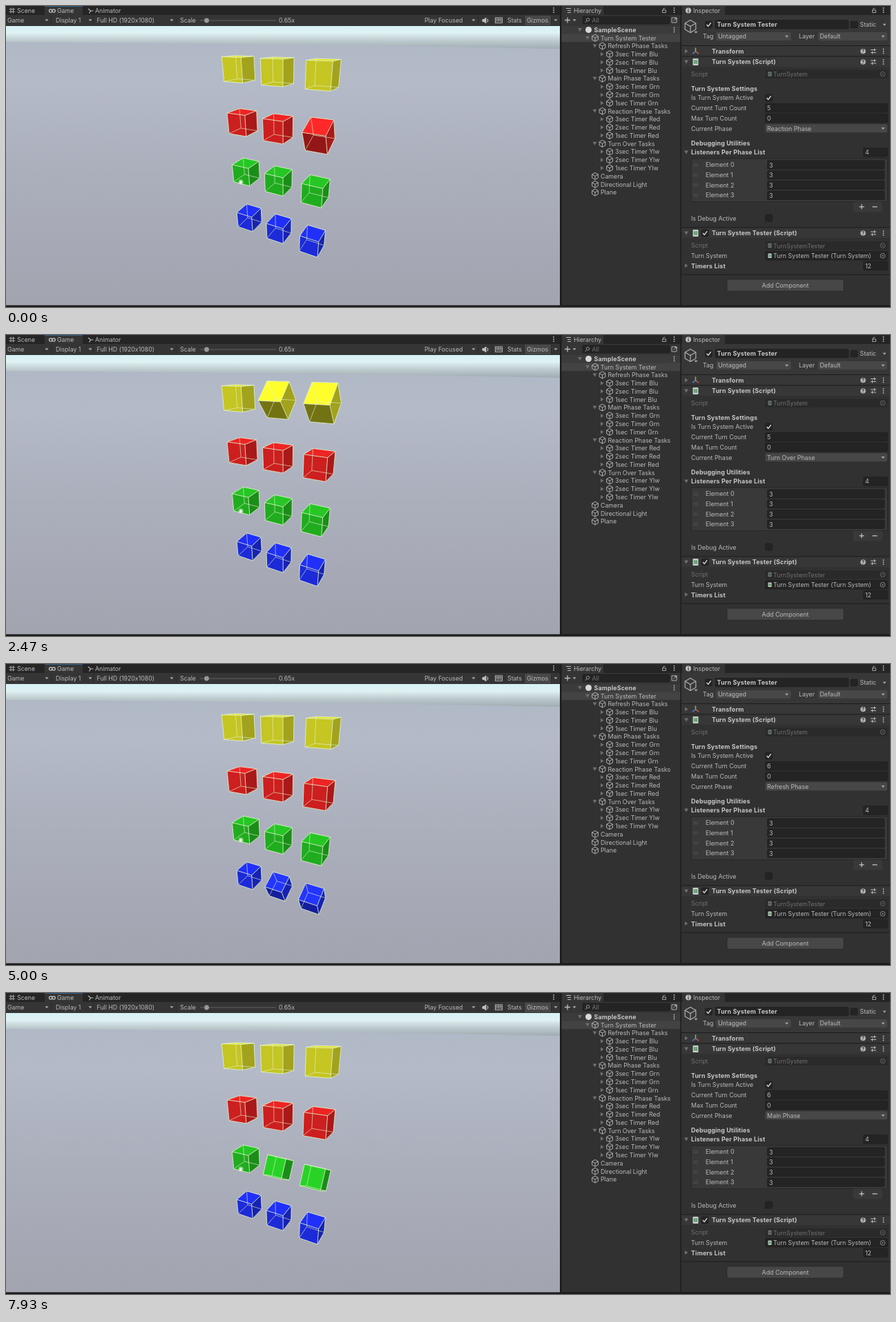
Recreate the animation shown at these times as an HTML page with a canvas. Size 1280 by 436 pixels, loop 8 s.

```html
<!DOCTYPE html>
<html lang="en">
<head>
<meta charset="utf-8">
<title>Turn System Tester</title>
<style>
  html, body { margin: 0; width: 100%; height: 100%; overflow: hidden; background: #191919; }
  canvas, svg { position: absolute; left: 0; top: 0; }
  text { font: 8.8px Inter, Roboto, sans-serif; fill: #bababa; white-space: pre; }
  .bold { font-weight: 700; fill: #c8c8c8; letter-spacing: .2px; }
  .dim { fill: #707070; }
</style>
</head>
<body>
<canvas id="game" width="802" height="436"></canvas>
<svg id="ui" width="1280" height="436" viewBox="0 0 1280 436"></svg>
<script>
const LOOP = 8000, FRAME = 1000 / 15;
const PHASE_START = 545, PHASE_LENGTH = 3000, SPIN = 540;
const PHASES = ['Reaction Phase', 'Turn Over Phase', 'Refresh Phase', 'Main Phase'];
const PHASE_ROWS = [1, 0, 3, 2];

// ---------- Editor panels ----------
const ui = document.getElementById('ui');
const BG = '#313131', HEADER = '#373737', FIELD = '#242424', BUTTON = '#474747', LINE = '#1d1d1d', INK = '#bababa';

const put = markup => ui.insertAdjacentHTML('beforeend', markup);
const rect = (x, y, w, h, fill, r = 0, extra = '') =>
  put(`<rect x="${x}" y="${y}" width="${w}" height="${h}" rx="${r}" fill="${fill}" ${extra}/>`);
const text = (x, y, s, cls = '', id = '') => put(`<text x="${x}" y="${y}" class="${cls}" id="${id}">${s}</text>`);
const path = (d, color = INK, width = 1, fill = 'none') =>
  put(`<path d="${d}" stroke="${color}" stroke-width="${width}" fill="${fill}"/>`);
const circle = (x, y, r, fill, stroke = 'none') =>
  put(`<circle cx="${x}" cy="${y}" r="${r}" fill="${fill}" stroke="${stroke}"/>`);

const caret = (x, y) => path(`M${x - 2.5} ${y - 1.2}h5l-2.5 3z`, 'none', 0, '#a8a8a8');
const foldout = (x, y, open) =>
  path(open ? `M${x - 3} ${y - 2.5}h6l-3 5z` : `M${x - 2} ${y - 3}v6l4.5 -3z`, 'none', 0, '#6f6f6f');
const kebab = (x, y) => [-3, 0, 3].forEach(d => circle(x, y + d, .9, INK));
const lock = (x, y) => path(`M${x - 2.5} ${y}h5v3.500h-5zM${x - 1.5} ${y}v-2q1.500 -2 3 0`, '#b0b0b0', .9);
const cubeIcon = (x, y, r = 5, width = 1) => {
  const w = r * .87, h = r / 2;
  path(`M${x} ${y - r}l${w} ${h}v${r}l${-w} ${h}l${-w} ${-h}v${-r}zM${x - w} ${y - h}l${w} ${h}l${w} ${-h}M${x} ${y}v${r}`, '#b0b0b0', width);
};
const field = (x, y, w, h = 12.5) => rect(x, y, w, h, FIELD, 1.5, 'stroke="#1b1b1b" stroke-width=".6"');
const dropdown = (x, y, w, label, id) => {
  rect(x, y, w, 12, BUTTON, 2);
  text(x + 2.5, y + 9.2, label, '', id);
  caret(x + w - 6, y + 6);
};
const checkbox = (x, y, on) => {
  field(x, y, 10, 10);
  if (on) path(`M${x + 2} ${y + 5}l2.2 2.5l4 -5.2`, '#d5d5d5', 1.4);
};
const scriptIcon = (x, y, k = 1, page = '#c4cdc6', mark = '#3c8a50') => {
  rect(x - 4 * k, y - 5 * k, 8 * k, 10 * k, page, 1);
  path(`M${x - 1.2 * k} ${y - 3 * k}v${6 * k}m${2.4 * k} ${-6 * k}v${6 * k}M${x - 3 * k} ${y - 1.2 * k}h${6 * k}m${-6 * k} ${2.4 * k}h${6 * k}`, mark, .9 * k);
};
const targetRing = (y, color = '#888') => { circle(1269.5, y, 3.4, 'none', color); circle(1269.5, y, 1.1, color); };
const componentHeader = (y, title, open) => {
  rect(978, y - 8, 302, 15, HEADER);
  rect(978, y - 8.5, 302, 1, LINE);
  foldout(985, y, open);
  text(1022, y + 3.2, title, 'bold');
  circle(1241, y, 3.8, '#b4b4b4');
  put(`<text x="1239" y="${y + 2.6}" style="font-size:7px;font-weight:700;fill:#333">?</text>`);
  path(`M1252 ${y - 2}h8M1252 ${y + 2}h8M1257.5 ${y - 4}v4M1254.5 ${y}v4`);
  kebab(1270.5, y);
};

function gameToolbar() {
  rect(0, 0, 803, 13, '#252525');
  rect(0, 13, 803, 16, '#353535');
  rect(56, 0, 55, 13, '#353535');
  rect(56, 0, 55, 1, '#315f8c');
  path('M7 2.5v8M10.5 2.5v8M4.5 4.8h8.5M4.5 8.3h8.5', '#aaa', 1);
  text(16, 9.7, 'Scene');
  path('M62.5 7a2.2 2.2 0 1 0 4.4 0a2.2 2.2 0 1 0 4.4 0a2.2 2.2 0 1 0 -4.4 0a2.2 2.2 0 1 0 -4.4 0', '#c8c8c8', 1.2);
  text(74, 9.7, 'Game');
  path('M119 4l3.5 3h4M122.500 7l-2 3.500', '#bababa', 1.2);
  text(129, 9.7, 'Animator');
  kebab(793, 6);
  rect(751, 14, 38, 14, '#484848');
  [[2, 'Game'], [72, 'Display 1'], [131.5, 'Full HD (1920x1080)'], [252, 'Scale'], [395, '0.65x'],
   [606, 'Play Focused'], [726, 'Stats'], [754, 'Gizmos']].forEach(([x, s]) => text(x, 23.8, s));
  [59, 122, 240, 677, 796].forEach(x => caret(x, 20.5));
  [65, 126, 246, 683, 703, 722, 750, 789].forEach(x => rect(x, 14, .7, 14, '#272727'));
  rect(281, 20.5, 110, 1, '#626262');
  circle(290.5, 21, 3.4, '#999');
  path('M690 19.500h2l3 -2.500v8l-3 -2.500h-2zM697 18.500q2 2.300 0 5', '#c0c0c0', 1, '#c0c0c0');
  rect(708.5, 17, 10, 7.5, 'none', 0, 'stroke="#bababa" stroke-width=".9"');
  path('M708.500 19.500h10M708.500 22h10M711 17v5M713.500 17v5M716 17v5', INK, .7);
  rect(0, 433.5, 1280, 2.5, '#191919');
}

function hierarchy() {
  rect(803, 0, 174, 433.5, BG);
  rect(802, 0, 2.5, 436, LINE);
  rect(804.5, 0, 172, 13, '#252525');
  rect(805, 0, 60, 13, '#353535');
  rect(804.5, 13, 172, 15, '#353535');
  path('M811 3.500h7M813 6.500h5M813 9.500h5', INK, 1.1);
  text(822, 9.7, 'Hierarchy');
  lock(953, 6); kebab(967.5, 6);
  path('M809 20.500h8M813 16.500v8', INK, 1.3);
  caret(823, 20.5);
  field(835, 15, 126, 11);
  circle(842.5, 19.8, 2.2, 'none', '#999');
  path('M841 21.500l-2.500 2.500', '#999');
  text(848.5, 23.6, 'All', 'dim');
  path('M964 17h7v7h-7zM966.500 21.500l4 -4M968 17.500h3v3', INK, .9);

  rect(804.5, 28.5, 172, 11.8, '#3b3b3b');
  rect(804.5, 40.3, 172, 11.8, '#434343');
  foldout(831, 34.5, true);
  circle(843.5, 34.5, 4.5, '#d8d8d8');
  text(851.5, 37.6, 'SampleScene', 'bold');
  kebab(967.5, 34.5);

  const rows = [[0, 'Turn System Tester', true]];
  [['Refresh Phase', 'Blu'], ['Main Phase', 'Grn'], ['Reaction Phase', 'Red'], ['Turn Over', 'Ylw']].forEach(([name, color]) => {
    rows.push([1, name + ' Tasks', true]);
    [3, 2, 1].forEach(n => rows.push([2, `${n}sec Timer ${color}`, false]));
  });
  ['Camera', 'Directional Light', 'Plane'].forEach(s => rows.push([0, s]));
  rows.forEach(([level, label, open], i) => {
    const x = level * 10.5, y = 46.2 + i * 11.78;
    if (open !== undefined) foldout(842 + x, y, open);
    cubeIcon(853 + x, y);
    text(861 + x, y + 3.3, label);
  });
}

function inspector() {
  rect(977, 0, 303, 433.5, BG);
  rect(976.5, 0, 1.5, 436, LINE);
  rect(978, 0, 302, 13, '#252525');
  rect(979, 0, 62, 13, '#353535');
  rect(978, 13, 302, 44, HEADER);
  circle(988, 6.5, 4, '#c0c0c0');
  path('M988 5.700v3.500M988 3.500v1.200', '#333', 1.2);
  text(995, 9.7, 'Inspector');
  lock(1257, 6); kebab(1270.5, 6);

  cubeIcon(991, 29.5, 9, 1.2);
  caret(999, 38);
  checkbox(1012.5, 22, true);
  field(1027, 20.5, 193);
  text(1029.5, 30.4, 'Turn System Tester', 'bold');
  checkbox(1223, 22, false);
  text(1236.5, 30.2, 'Static');
  caret(1272, 27);
  text(1009, 47.2, 'Tag');
  dropdown(1028.5, 38, 108, 'Untagged');
  text(1148, 47.2, 'Layer');
  dropdown(1176, 38, 100, 'Default');

  componentHeader(65.5, 'Transform', false);
  path('M998.500 66v-5.500', '#8bc34a', 1.5);
  path('M998.500 66l-4.500 3', '#4a8fe0', 1.5);
  path('M998.500 66l4.500 3', '#e05a48', 1.5);
  componentHeader(81, 'Turn System (Script)', true);
  scriptIcon(998.5, 81);

  const scriptRow = (y, name) => {
    text(992, y + 3, 'Script', 'dim');
    rect(1099.5, y - 6, 177, 12.5, '#2a2a2a', 1.5);
    scriptIcon(1106, y, .65, '#727673', '#35553e');
    text(1111, y + 3.5, name, 'dim');
    targetRing(y, '#666');
  };
  scriptRow(98.5, 'TurnSystem');
  text(992, 122.6, 'Turn System Settings', 'bold');
  text(992, 136, 'Is Turn System Active');
  checkbox(1099.5, 128, true);
  text(992, 150.8, 'Current Turn Count');
  field(1099.5, 141.5, 177);
  text(1102, 151.2, '5', '', 'turn');
  text(992, 165.5, 'Max Turn Count');
  field(1099.5, 156.2, 177);
  text(1102, 165.9, '0');
  text(992, 180.5, 'Current Phase');
  dropdown(1099.5, 171.3, 176.5, PHASES[0], 'phase');

  text(992, 202.2, 'Debugging Utilities', 'bold');
  foldout(985, 212, true);
  text(992, 215.4, 'Listeners Per Phase List', 'bold');
  field(1241.5, 205.7, 35);
  text(1244, 215.4, '4');
  rect(992, 221, 284.5, 62.5, '#393939', 2, 'stroke="#222" stroke-width=".7"');
  rect(1227, 283.5, 42, 15, '#393939', 2);
  for (let i = 0; i < 4; i++) {
    const y = 230 + i * 14.7;
    path(`M995 ${y - 1}h7M995 ${y + 1.5}h7`, '#555', .8);
    text(1013, y + 3.3, 'Element ' + i);
    field(1102.5, y - 6.2, 169.5);
    text(1105, y + 3.5, '3');
  }
  path('M1235.500 290.800h7M1239 287.300v7M1254.500 290.800h7', '#c8c8c8', 1.2);
  text(992, 310.8, 'Is Debug Active');
  checkbox(1099.5, 302, false);

  componentHeader(329, 'Turn System Tester (Script)', true);
  scriptIcon(998.5, 329);
  checkbox(1007, 324, true);
  scriptRow(347, 'TurnSystemTester');
  text(992, 365, 'Turn System');
  field(1099.5, 355.5, 177);
  scriptIcon(1106, 361.8, .65);
  text(1111, 365.2, 'Turn System Tester (Turn System)');
  targetRing(361.8);
  foldout(985, 376, false);
  text(992, 379.5, 'Timers List', 'bold');
  field(1241.5, 370, 35);
  text(1244, 379.7, '12');
  rect(978, 388.5, 302, 1, LINE);
  rect(1044, 396, 169, 17, BUTTON, 2, 'stroke="#272727" stroke-width=".7"');
  put('<text x="1128.5" y="407.600" text-anchor="middle">Add Component</text>');
}

gameToolbar();
hierarchy();
inspector();

// ---------- Game view ----------
const g = document.getElementById('game').getContext('2d');
const radians = d => d * Math.PI / 180;
const FOCAL = 391, CENTER = [401.5, 255], SIZE = .078;
const [PS, PC] = [Math.sin(radians(28)), Math.cos(radians(28))];
const [YS, YC] = [Math.sin(radians(27)), Math.cos(radians(27))];
const LIGHT = [.321, .766, -.557];
const ROWS = [
  { y: -.093, color: [255, 255, 45] },
  { y: -.280, color: [265, 40, 40] },
  { y: -.488, color: [42, 222, 40] },
  { y: -.720, color: [36, 54, 280] }
];
const COLUMNS = [[-.1535, 1.01], [-.018, .93], [.117, .85]];

// Corner bits: 1 = right, 2 = top, 4 = back. Faces wind clockwise seen from outside.
const CORNERS = [...Array(8).keys()].map(i => [i & 1, i >> 1 & 1, i >> 2].map(b => b - .5));
const FACES = [
  { n: [1, 0, 0], v: [1, 3, 7, 5] }, { n: [-1, 0, 0], v: [0, 4, 6, 2] },
  { n: [0, 1, 0], v: [2, 6, 7, 3] }, { n: [0, -1, 0], v: [0, 1, 5, 4] },
  { n: [0, 0, -1], v: [0, 2, 3, 1] }, { n: [0, 0, 1], v: [4, 5, 7, 6] }
];
const EDGES = CORNERS.flatMap((_, i) => [1, 2, 4].filter(b => !(i & b)).map(b => [i, i | b]));

function project([x, y, z]) {
  const depth = z * PC - y * PS;
  return [CENTER[0] + FOCAL * x / depth, CENTER[1] - FOCAL * (y * PC + z * PS) / depth];
}

function drawCube(row, column, angle) {
  const s = Math.sin(angle), c = Math.cos(angle);
  const spin = ([x, y, z]) => [x, y * c + z * s, z * c - y * s];
  const [cx, cz] = COLUMNS[column], { y: cy, color } = ROWS[row];
  const points = CORNERS.map(corner => {
    const [x, y, z] = spin(corner).map(v => v * SIZE);
    return project([cx + x * YC + z * YS, cy + y, cz - x * YS + z * YC]);
  });
  const front = new Set();
  for (const { n, v } of FACES) {
    const p = v.map(i => points[i]);
    const area = p.reduce((sum, a, i) => { const b = p[(i + 1) % 4]; return sum + a[0] * b[1] - b[0] * a[1]; }, 0);
    if (area <= 0) continue;
    v.forEach((a, i) => { const b = v[(i + 1) % 4]; front.add(Math.min(a, b) * 8 + Math.max(a, b)); });
    const lit = Math.max(0, spin(n).reduce((sum, q, i) => sum + q * LIGHT[i], 0));
    g.fillStyle = `rgb(${color.map(q => Math.min(255, Math.round(q * (.45 + .58 * lit))))})`;
    g.beginPath();
    p.forEach(q => g.lineTo(...q));
    g.fill();
  }
  for (const [a, b] of EDGES) {
    g.strokeStyle = `rgba(228,246,205,${front.has(a * 8 + b) ? .8 : .6})`;
    g.beginPath();
    g.moveTo(...points[a]);
    g.lineTo(...points[b]);
    g.stroke();
  }
}

function gradient(y0, y1, ...stops) {
  const fill = g.createLinearGradient(0, y0, 0, y1);
  stops.forEach(([at, color]) => fill.addColorStop(at, color));
  return fill;
}
const sky = gradient(29, 62, [0, '#d6f1f6'], [.3, '#e0f2f3'], [.65, '#bccacd'], [1, '#a0abb2']);
const ground = gradient(52, 433, [0, '#b0b8c6'], [.15, '#b4bac8'], [.5, '#abafbc'], [1, '#a2a4af']);

function drawScene() {
  g.fillStyle = sky;
  g.fillRect(0, 29, 803, 40);
  g.fillStyle = ground;
  g.beginPath();
  g.moveTo(0, 52);
  g.quadraticCurveTo(400, 54, 803, 62);
  g.lineTo(803, 434);
  g.lineTo(0, 434);
  g.fill();
}

function drawLightIcon() {
  for (const [r, color] of [[4, 'rgba(225,255,215,.35)'], [2.2, '#eaf7e2']]) {
    g.fillStyle = color;
    g.beginPath();
    g.arc(340, 255, r, 0, 7);
    g.fill();
  }
}

const turnLabel = document.getElementById('turn'), phaseLabel = document.getElementById('phase');

function draw(now) {
  const t = Math.floor((now % LOOP + 4) / FRAME) * FRAME % LOOP;
  const sinceReaction = t - PHASE_START + PHASE_LENGTH;
  const phase = Math.floor(sinceReaction / PHASE_LENGTH);
  const elapsed = sinceReaction % PHASE_LENGTH / 1000;

  drawScene();
  g.lineWidth = 1;
  g.lineJoin = 'round';
  ROWS.forEach((_, row) => COLUMNS.forEach((_, column) => {
    const spinning = row === PHASE_ROWS[phase] && elapsed < column + 1;
    drawCube(row, column, spinning ? radians(-SPIN * elapsed) : 0);
  }));
  drawLightIcon();
  turnLabel.textContent = phase < 2 ? 5 : 6;
  phaseLabel.textContent = PHASES[phase];
  requestAnimationFrame(() => draw(performance.now()));
}
draw(0);
</script>
</body>
</html>
```
